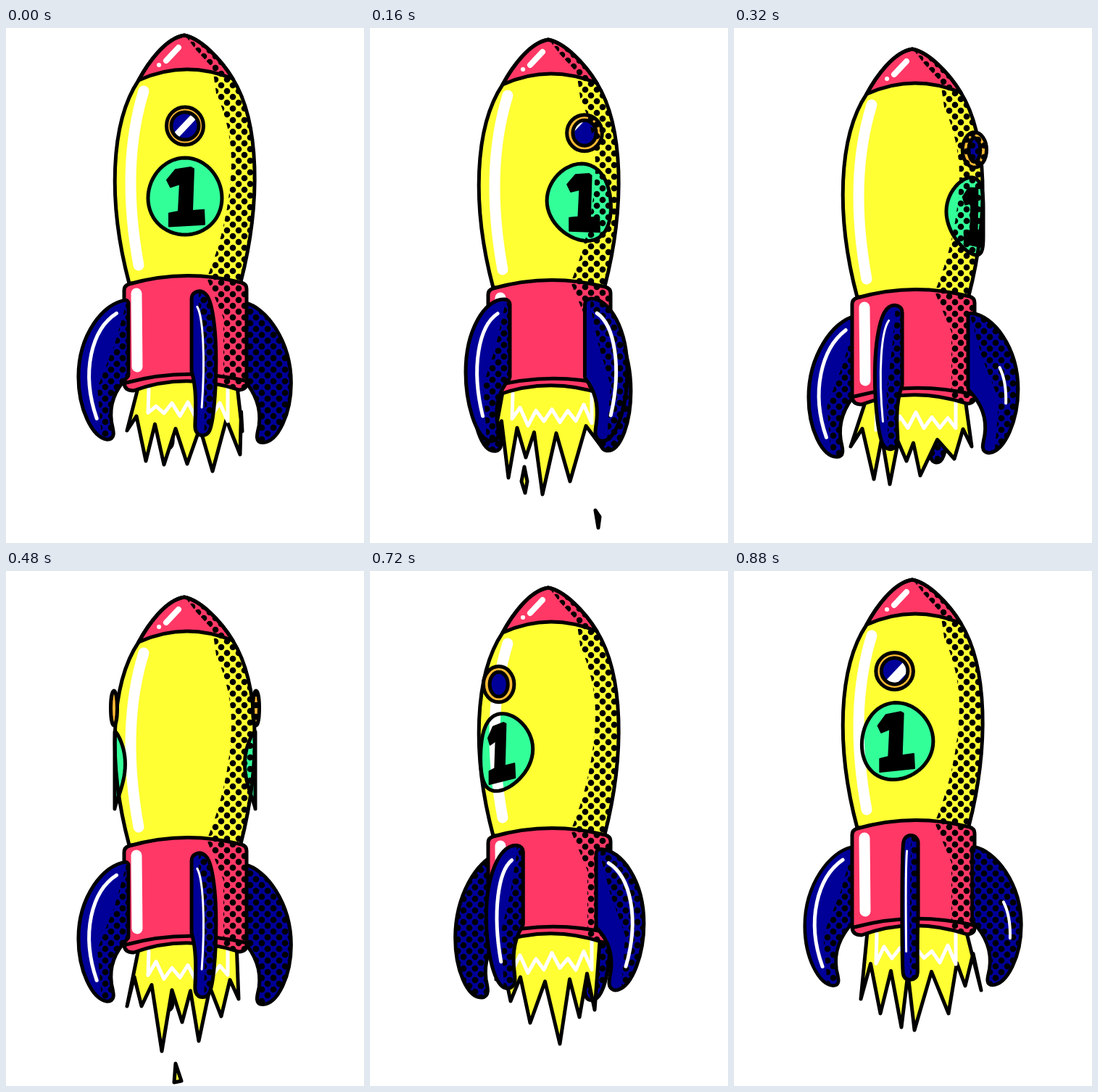
An HTML page with a canvas that plays this animation: 494x710 px, repeating every 0.96 s.

```html
<!DOCTYPE html>
<html lang="en">
<head>
<meta charset="utf-8">
<title>Spinning rocket</title>
<style>
html, body { margin: 0; width: 100%; height: 100%; overflow: hidden; background: #fff; }
canvas { display: block; }
</style>
</head>
<body>
<canvas id="stage" width="494" height="710"></canvas>
<script>
const ctx = document.getElementById('stage').getContext('2d');
const STEP = 80, STEPS = 12, CX = 247, RADIUS = 97;
const INK = '#000', RED = '#ff3866', YELLOW = '#ffff33', GREEN = '#33ff99',
      NAVY = '#000099', ORANGE = '#ffbb33', WHITE = '#fff';
const rad = deg => deg * Math.PI / 180;

const nose = 'M183 72C196 48 220 14 246 10C268 14 296 42 313 70';
const bodyPath = new Path2D(nose + 'C350 130 352 240 324 350L170 352C140 240 144 130 183 72Z');
const conePath = new Path2D(nose + 'Q247 43 183 72Z');
const bandPath = new Path2D('M163 362Q163 355 170 353Q247 331 325 351Q332 353 332 360V490' +
  'Q332 498 322 499Q247 474 176 500Q164 500 163 490Z');
const rimPath = new Path2D('M166 489Q247 467 329 486');
const shadePath = new Path2D('M244 6L262 30L285 55L290 90Q312 140 311 190Q308 270 277 345L300 400V510H400V6Z');
const bodyShine = new Path2D('M190 87Q158 190 183 327');

// Fin outlines use distance from the axis as x.
const finPath = new Path2D('M84 381C112 386 147 430 147 487C147 530 128 566 110 567' +
  'C102 567 106 558 108 547C112 520 100 497 84 480Z');
const finShine = new Path2D('M97 396C132 420 148 480 125 543');
const finGlint = new Path2D('M125 455Q135 475 134 505');
const finMid = [[84, 385], [100, 440], [124, 500], [118, 570], [118, 600]];

const digit = [[-13, -37], [8, -40], [12, -38], [10, 20], [26, 18], [27, 38], [-22, 41],
  [-22, 23], [-9, 21], [-7, -17], [-20, -13], [-25, -23]];
const disc = Array.from({ length: 60 }, (_, i) => [51 * Math.cos(rad(i * 6)), 53 * Math.sin(rad(i * 6))]);

// Flame tips by step; steps without an entry mirror the one before.
const flames = {
  0: [167, 555, 193, 597, 218, 602, 250, 601, 285, 611, 323, 588, 326, 556],
  2: [172, 562, 191, 620, 215, 592, 238, 643, 276, 625, 320, 578],
  4: [161, 577, 193, 622, 215, 629, 238, 597, 257, 617, 304, 594, 328, 577],
  6: [167, 600, 187, 600, 215, 662, 243, 622, 266, 648, 297, 614, 321, 590],
  8: [182, 612, 203, 622, 230, 659, 271, 630, 298, 600, 318, 570],
  10: [178, 577, 198, 601, 220, 626, 257, 599, 280, 624, 308, 599, 328, 576],
  11: [175, 590, 202, 610, 231, 629, 249, 633, 296, 610, 319, 572, 341, 578]
};
const sparks = {
  2: ['M213 605L217 625L214 641L209 625Z', 'M311 665L317 674L315 689Z'],
  6: ['M234 679L242 703L232 705Z'],
  8: ['M333 618L342 645L335 652Z']
};

const dots = (() => {
  const tile = document.createElement('canvas');
  tile.width = tile.height = 16;
  const t = tile.getContext('2d');
  for (const [x, y] of [[9, -1], [9, 15], [1, 7], [17, 7]]) {
    t.beginPath();
    t.arc(x, y, 4.3, 0, 7);
    t.fill();
  }
  return ctx.createPattern(tile, 'repeat');
})();

function stroke(path, width, color = INK) {
  ctx.lineWidth = width;
  ctx.strokeStyle = color;
  ctx.stroke(path);
}
function fill(path, color) {
  ctx.fillStyle = color;
  ctx.fill(path);
}
function clipped(path, draw) {
  ctx.save();
  ctx.clip(path);
  draw();
  ctx.restore();
}
function polygon(points, closed = true) {
  const path = new Path2D();
  points.forEach(([x, y]) => path.lineTo(x, y));
  if (closed) path.closePath();
  return path;
}
const bob = k => Math.round(13 - 13 * Math.cos(rad(k * 30)));
const noise = n => { const v = Math.sin(n * 12.9898) * 43758.5453; return v - Math.floor(v); };

function drawFin(deg) {
  const s = Math.sin(rad(deg)), c = Math.cos(rad(deg));
  const lift = c < 0 ? c * 0.4 : c;
  const matrix = { a: s, b: -0.3 * lift, c: 0, d: 1, e: CX, f: 17 * lift };
  const turn = (path, dx = 0) => {
    const p = new Path2D();
    p.addPath(path, { ...matrix, e: CX + dx });
    return p;
  };
  const thick = c < 0 ? -10 * c : 16 * c;
  const shape = turn(finPath);
  stroke(shape, thick + 9);
  stroke(shape, Math.max(thick - 1, 0.1), NAVY);
  fill(shape, NAVY);

  const spotted = () => {
    fill(shape, dots);
    if (thick > 2) stroke(shape, thick, dots);
  };
  if (deg > 80 || c < -0.4) {
    spotted();
  } else {
    const edge = finMid.map(([r, y]) => [CX + r * s, y + lift * (17 - 0.3 * r)]);
    clipped(polygon([[edge[0][0], 340], ...edge, [edge[4][0] + 90, 600], [edge[0][0] + 90, 340]]), spotted);
  }
  if (deg > 60 && deg < 95) stroke(turn(finGlint), 4, WHITE);
  else if (deg <= 60 && deg > -120) {
    const facing = Math.abs(deg) < 30;
    stroke(turn(finShine, facing ? -5 : 0), facing ? 3 : 5, WHITE);
  }
}

function drawFlame(k, dy) {
  let row = flames[k], tips = [];
  const source = row || flames[k - 1];
  for (let i = 0; i < source.length; i += 2) tips.push([source[i], source[i + 1] - bob(row ? k : k - 1)]);
  if (!row) tips = tips.map(([x, y]) => [492 - x, y]).reverse();

  const outline = [[185, 485]];
  tips.forEach(([x, y], i) => {
    if (i) {
      const mx = (x + tips[i - 1][0]) / 2;
      const my = 553 - 0.004 * (mx - CX) ** 2;
      outline.push([mx, Math.min(my, y - 18, tips[i - 1][1] - 18)]);
    }
    outline.push([x, y]);
  });
  outline.push([318, 485]);
  const shape = polygon(outline);
  fill(shape, YELLOW);
  stroke(shape, 5);

  const glow = [[197, 498]];
  for (let i = 0; i < 11; i++) {
    glow.push([196 + i * 11, (i % 2 ? 514 : 534) + 12 * (noise(k * 17 + i) - 0.3)]);
  }
  glow.push([306, 498]);
  stroke(polygon(glow, false), 5, WHITE);

  ctx.save();
  ctx.translate(0, -dy);
  for (const d of sparks[k] || []) {
    const spark = new Path2D(d);
    fill(spark, YELLOW);
    stroke(spark, 5);
  }
  ctx.restore();
}

// Wraps flat points around the hull; parts past the limb collapse onto it.
function wrap(points, deg) {
  return polygon(points.map(([u, v]) => {
    const a = Math.max(-Math.PI / 2, Math.min(Math.PI / 2, rad(deg) + Math.asin(u / RADIUS)));
    return [CX + RADIUS * Math.sin(a), 232 + v + 17 * (1 - Math.cos(a))];
  }));
}

function portholeAt(deg) {
  const s = Math.sin(rad(deg)), c = Math.max(0, Math.cos(rad(deg)));
  const x = CX + 98 * s, y = 135 + 28 * (1 - c), side = Math.abs(s);
  const oval = (rx, ry) => {
    const p = new Path2D();
    p.ellipse(x, y, rx, ry, 0, 0, 2 * Math.PI);
    return p;
  };
  return { deg, x, y, outer: oval(25.5 * c + 4.5 * side, 26 - 2 * side),
    inner: c > 0.15 ? oval(22 * c - 3, 19 - 3 * side) : null };
}

function drawPorthole({ deg, x, y, outer, inner }) {
  fill(outer, ORANGE);
  stroke(outer, 5);
  if (!inner) return;
  fill(inner, NAVY);
  clipped(inner, () => {
    if (Math.abs(deg) > 40) return;
    const shift = -deg / 3;
    const streak = polygon([[x + shift - 16, y + shift + 17], [x + shift + 16, y + shift - 17]], false);
    stroke(streak, deg > 0 ? 5 : 9 - deg / 3, WHITE);
  });
  stroke(inner, 5);
}

function drawHull(turn) {
  const sides = [turn, turn - 180];
  const badges = sides.filter(a => Math.abs(a) < 115);
  const portholes = sides.filter(a => Math.abs(a) <= 90).map(portholeAt);

  fill(bodyPath, YELLOW);
  badges.forEach(a => fill(wrap(disc, a), GREEN));
  stroke(bodyShine, 15, WHITE);
  badges.forEach(a => {
    stroke(wrap(disc, a), 5);
    if (Math.abs(a) < 80) {
      const one = wrap(digit, a);
      fill(one, INK);
      stroke(one, 2);
    }
  });
  fill(conePath, RED);
  stroke(new Path2D('M238 27L221 45'), 8, WHITE);
  stroke(new Path2D('M211 51h.1'), 6, WHITE);
  stroke(conePath, 5);
  stroke(bodyPath, 5);
  portholes.forEach(drawPorthole);

  const shaded = new Path2D(bodyPath);
  portholes.forEach(p => shaded.addPath(p.outer));
  clipped(shaded, () => fill(shadePath, dots));
}

function drawBand() {
  fill(bandPath, RED);
  stroke(new Path2D('M180 366L181 467'), 15, WHITE);
  clipped(bandPath, () => fill(shadePath, dots));
  stroke(rimPath, 5);
  stroke(bandPath, 5);
}

function draw(k) {
  const dy = bob(k), turn = k * 15;
  ctx.setTransform(1, 0, 0, 1, 0, 0);
  ctx.fillStyle = WHITE;
  ctx.fillRect(0, 0, 494, 710);
  ctx.lineJoin = ctx.lineCap = 'round';
  ctx.translate(0, dy);

  const fins = [0, 90, 180, 270]
    .map(a => (a + 13 + turn + 180) % 360 - 180)
    .sort((a, b) => Math.abs(b) - Math.abs(a));
  fins.filter(a => Math.abs(a) > 90).forEach(drawFin);
  drawFlame(k, dy);
  drawHull(turn);
  drawBand();
  fins.filter(a => Math.abs(a) <= 90).forEach(drawFin);
}

function tick() {
  draw(Math.floor(performance.now() / STEP) % STEPS);
  requestAnimationFrame(tick);
}
tick();
</script>
</body>
</html>
```
